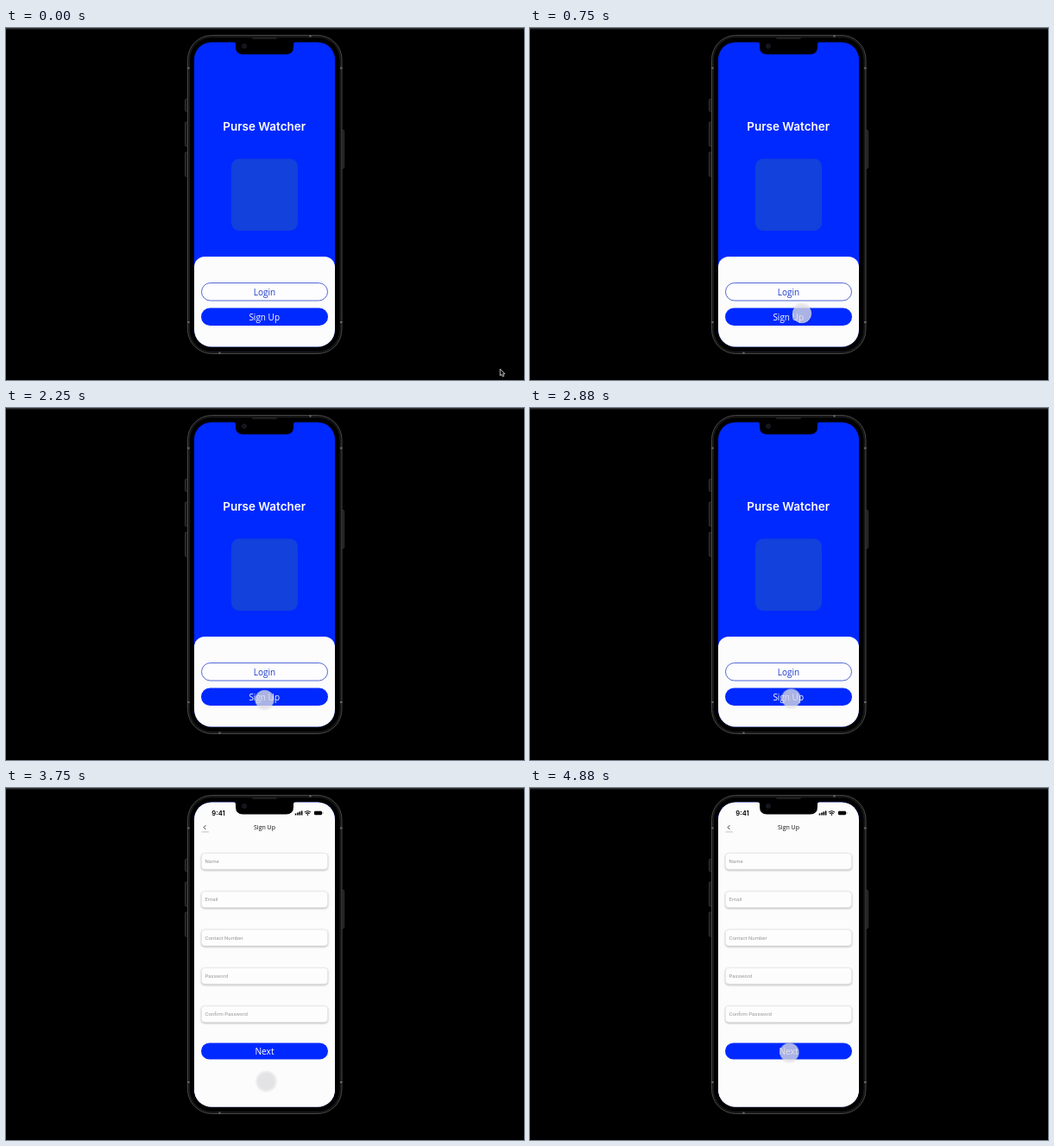
An HTML page that plays this animation: 600 px wide and 408 px high, repeating every 5.01 s.

```html
<!DOCTYPE html>
<html lang="en">
<head>
<meta charset="utf-8">
<title>Sign up flow</title>
<style>
  html, body { margin: 0; width: 100%; height: 100%; overflow: hidden; background: #000; }
  svg { display: block; width: 600px; height: 408px; }

  .open { font-family: "Open Sans", sans-serif; }
  .inter { font-family: Inter, sans-serif; font-weight: 600; }
  .mid { text-anchor: middle; }
  .hint { font: 6px Roboto, sans-serif; fill: #999; }
  .field { fill: #fdfdfd; stroke: #e3e3e3; stroke-width: .7; filter: drop-shadow(0 1.3px .8px rgba(0, 0, 0, .27)); }
  .touch { fill: rgba(236, 236, 238, .72); stroke: rgba(255, 255, 255, .5); stroke-width: .7; filter: drop-shadow(0 .8px .8px rgba(0, 0, 0, .28)); }

  #form, #arrow, #touch { animation: 5010ms step-end infinite; }
  #form { animation-name: form; }
  #arrow { animation-name: arrow; }
  #touch { animation-name: touch; }

  @keyframes form {
    0% { visibility: hidden; }
    74.84%, 100% { visibility: visible; }
  }
  @keyframes arrow {
    0% { transform: translate(572px, 395px); visibility: visible; }
    2.59% { transform: translate(552px, 389px); visibility: visible; }
    4.98% { transform: translate(498px, 372px); visibility: visible; }
    7.58% { transform: translate(432px, 352px); visibility: visible; }
    9.97%, 100% { transform: translate(378px, 338px); visibility: hidden; }
  }
  @keyframes touch {
    0% { transform: translate(378px, 338px); visibility: hidden; }
    9.97% { transform: translate(369px, 336px); visibility: visible; }
    12.57% { transform: translate(335px, 332px); }
    14.96% { transform: translate(315px, 331px); }
    17.56% { transform: translate(306px, 334px); }
    19.95% { transform: translate(301px, 337px); }
    24.94% { transform: translate(299px, 338px); }
    34.92% { transform: translate(299.5px, 338px); }
    44.9% { transform: translate(299.5px, 338px); }
    52.48% { transform: translate(301px, 337.5px); }
    57.47% { transform: translate(302.5px, 336.5px); }
    62.46% { transform: translate(302px, 338px); }
    72.44% { transform: translate(301.5px, 339px); }
    74.84% { transform: translate(301.5px, 340px); }
    84.82% { transform: translate(301.5px, 337px); }
    87.42% { transform: translate(301px, 329px); }
    89.81% { transform: translate(301px, 319px); }
    92.41% { transform: translate(300.5px, 311px); }
    94.8% { transform: translate(300.5px, 307px); }
    97.4%, 100% { transform: translate(300.5px, 306.5px); visibility: visible; }
  }
</style>
</head>
<body>
<svg viewBox="0 0 600 408">
  <defs>
    <clipPath id="screen"><rect x="218" y="16.5" width="163" height="353" rx="20"/></clipPath>
  </defs>
  <rect width="600" height="408"/>
  <rect width="600" height="1.5" fill="#2d2d2d"/>

  <!-- phone body -->
  <g fill="#191919" stroke="#444" stroke-width=".7">
    <rect x="207.5" y="82.5" width="3" height="14" rx="1"/>
    <rect x="207.5" y="109" width="3" height="28" rx="1"/>
    <rect x="207.5" y="144" width="3" height="28" rx="1"/>
    <rect x="388.5" y="118.5" width="3" height="44" rx="1"/>
  </g>
  <rect x="210.5" y="8.5" width="178.500" height="369" rx="28" fill="#111" stroke="#484848"/>
  <rect x="212.500" y="10.5" width="174.500" height="365" rx="26" fill="#000" stroke="#222" stroke-width=".8"/>
  <path d="M210 46.500h2.500M387 46.500h2.500M210 341h2.500M387 341h2.500M352.500 8v2.500M247.500 375.500v2.500" stroke="#666" stroke-width="2"/>
  <rect x="285" y="10.500" width="29" height="2.500" rx="1.200" fill="#1c1c1c"/>

  <g clip-path="url(#screen)">
    <g id="welcome">
      <rect x="217" y="16" width="165" height="354" fill="#0029ff"/>
      <text class="inter mid" x="299.200" y="119" font-size="13.500" fill="#fff">Purse Watcher</text>
      <rect x="261" y="151.500" width="77" height="83.500" rx="9" fill="#1341db"/>
      <rect x="218" y="265" width="163" height="125" rx="12" fill="#fcfcfd"/>
      <rect x="226.500" y="295.500" width="146" height="20.500" rx="10.250" fill="#fdfdff" stroke="#4059cf" stroke-width=".9"/>
      <text class="open mid" x="299.500" y="309.700" font-size="10" fill="#1c3bc9">Login</text>
      <rect x="226" y="324.500" width="147" height="20.500" rx="10.250" fill="#0029ff"/>
      <text class="open mid" x="299.200" y="338.500" font-size="10" fill="#fff">Sign Up</text>
    </g>

    <g id="form">
      <rect x="217" y="16" width="165" height="354" fill="#fcfcfc"/>
      <text class="inter" x="238.300" y="31.500" font-size="7.700">9:41</text>
      <path d="M335.500 31.500v-2M338 31.500v-3M340.300 31.500v-4M342.600 31.500v-5" stroke="#000" stroke-width="1.600"/>
      <path d="M345.800 28.200q3.600-3 7.200 0M347.200 29.800q2.200-1.800 4.400 0" fill="none" stroke="#000" stroke-width="1.100"/>
      <circle cx="349.400" cy="31.100" r=".8"/>
      <rect x="357" y="26.700" width="9" height="4.600" rx="1.300"/>
      <rect x="366.500" y="28.200" width=".9" height="1.600" fill="#777"/>
      <path d="M231.400 43.200l-2.300 2.400 2.300 2.400" fill="none" stroke="#222" stroke-width=".9"/>
      <path d="M226.500 50.800h8.500" stroke="#cfcfcf" stroke-width="1.200"/>
      <text class="open mid" x="299.500" y="48.300" font-size="7" fill="#111">Sign Up</text>
      <g id="fields"></g>
      <rect x="226" y="295.500" width="147" height="19" rx="9.500" fill="#0029ff"/>
      <text class="open mid" x="299.500" y="309" font-size="10.200" fill="#fff">Next</text>
    </g>
  </g>

  <!-- notch -->
  <path d="M263 16q3 0 3 3v3q0 8.500 8.500 8.500h50q8.500 0 8.500-8.500v-3q0-3 3-3z"/>
  <circle cx="276" cy="21" r="2.400" fill="#10131a" stroke="#252a35" stroke-width=".7"/>

  <circle id="touch" class="touch" r="10.800"/>
  <path id="arrow" d="M.3.300v7.700l1.800-1.600 1.200 2.700 1.500-.7-1.200-2.600h2.300z" fill="#000" stroke="#e8e8e8" stroke-width=".8"/>
</svg>
<script>
  const labels = ["Name", "Email", "Contact Number", "Password", "Confirm Password"];
  document.getElementById("fields").innerHTML = labels.map((label, i) => {
    const y = 75.5 + i * 44.3;
    return `<rect class="field" x="226.4" y="${y}" width="146.2" height="18.8" rx="4"/>
      <text class="hint" x="230.6" y="${y + 11.5}">${label}</text>`;
  }).join("");
</script>
</body>
</html>
```
